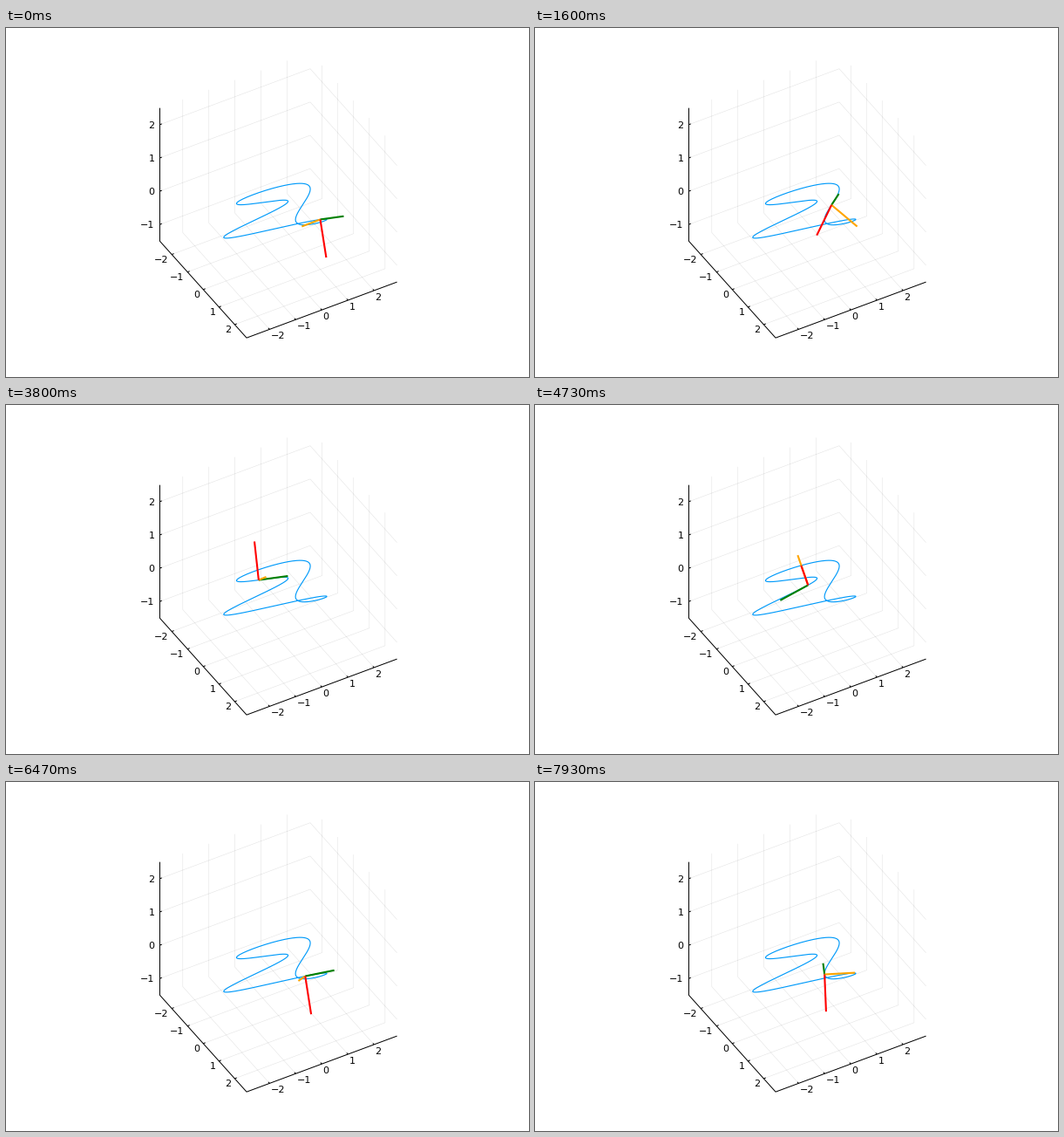
Write a matplotlib script that moves like this. It is 600 px wide and 400 px high and loops after 8 s.

```python
import numpy as np
import matplotlib.pyplot as plt
from matplotlib.animation import FuncAnimation

W, H, DPI = 600, 400, 100
FRAMES, LOOP_MS, STEPS_PER_TURN = 120, 8000, 100
PX = 72 / DPI  # points per pixel


def curve(t):
    return np.array([np.cos(t) + np.sin(2 * t),
                     np.sin(t) + np.cos(3 * t),
                     0.5 * np.sin(2 * t)])


def velocity(t):
    return np.array([-np.sin(t) + 2 * np.cos(2 * t),
                     np.cos(t) - 3 * np.sin(3 * t),
                     np.cos(2 * t)])


def acceleration(t):
    return np.array([-np.cos(t) - 4 * np.sin(2 * t),
                     -np.sin(t) - 9 * np.cos(3 * t),
                     -2 * np.sin(2 * t)])


def frenet(t):
    v, a = velocity(t), acceleration(t)
    tangent = v / np.linalg.norm(v)
    binormal = np.cross(v, a)
    binormal /= np.linalg.norm(binormal)
    return tangent, np.cross(binormal, tangent), binormal


path = curve(np.linspace(0, 2 * np.pi, 601))

# Axis limits leave one unit around the curve, two above it.
lo = path.min(axis=1) - 1
hi = path.max(axis=1) + np.array([1, 1, 2])
mid, half = (lo + hi) / 2, (hi - lo) / 2

# Orthographic view of the normalised box.
AZ, EL, SCALE = np.radians(60), np.radians(40), 99.6
CX, CY = 312.5, 191.4
VIEW = SCALE * np.array([
    [np.cos(AZ), np.sin(AZ), 0],
    [np.sin(AZ) * np.sin(EL), -np.cos(AZ) * np.sin(EL), -np.cos(EL)]])


def project(p):
    n = (np.asarray(p, float).T - mid) / half
    return (n @ VIEW.T + [CX, CY]).T


fig = plt.figure(figsize=(W / DPI, H / DPI), dpi=DPI, facecolor="white")
ax = fig.add_axes([0, 0, 1, 1])
ax.set_xlim(0, W)
ax.set_ylim(H, 0)
ax.axis("off")


def line(points, color, width, **kw):
    x, y = project(np.transpose(points))
    return ax.plot(x, y, color=color, lw=width * PX,
                   solid_capstyle="butt", **kw)[0]


def grid(*points):
    line(points, "black", 0.6, alpha=0.1)


def label(value, x, y, align):
    text = str(value).replace("-", "\u2212")
    ax.text(x, y + 4, text, ha=align, va="baseline",
            fontsize=8, family="DejaVu Sans")


(x0, y0, z0), (x1, y1, z1) = lo, hi
TICK = 0.014
dx, dy = TICK * (x1 - x0), TICK * (y1 - y0)

for k in range(-2, 3):
    grid((k, y0, z0), (k, y1, z0), (k, y1, z1))
    grid((x1, k, z0), (x0, k, z0), (x0, k, z1))
for k in range(-1, 3):
    grid((x0, y0, k), (x0, y1, k), (x1, y1, k))

line([(x0, y0, z1), (x0, y0, z0), (x1, y0, z0), (x1, y1, z0)], "black", 1)

for k in range(-2, 3):
    line([(k, y0, z0), (k, y0 + dy, z0)], "black", 1)
    px, py = project((k, y0, z0))
    label(k, px - 3.7, py + 5.3, "right")

    line([(x1, k, z0), (x1 - dx, k, z0)], "black", 1)
    px, py = project((x1, k, z0))
    label(k, px + 1.3, py + 7, "left")
for k in range(-1, 3):
    line([(x0, y0, k), (x0, y0 + dy, k)], "black", 1)
    px, py = project((x0, y0, k))
    label(k, px - 5.9, py, "right")

line(path.T, "#009AFA", 1.15)

arms = [ax.plot([], [], color=c, lw=2.1 * PX, solid_capstyle="butt")[0]
        for c in ("#008000", "#FFA500", "#FF0000")]


def update(i):
    t = 2 * np.pi * i / STEPS_PER_TURN
    p = curve(t)
    for arm, direction in zip(arms, frenet(t)):
        arm.set_data(*project(np.transpose([p, p + direction])))
    return arms


anim = FuncAnimation(fig, update, frames=FRAMES, interval=LOOP_MS / FRAMES,
                     init_func=lambda: update(0), repeat=True, repeat_delay=0)
plt.show()
```
